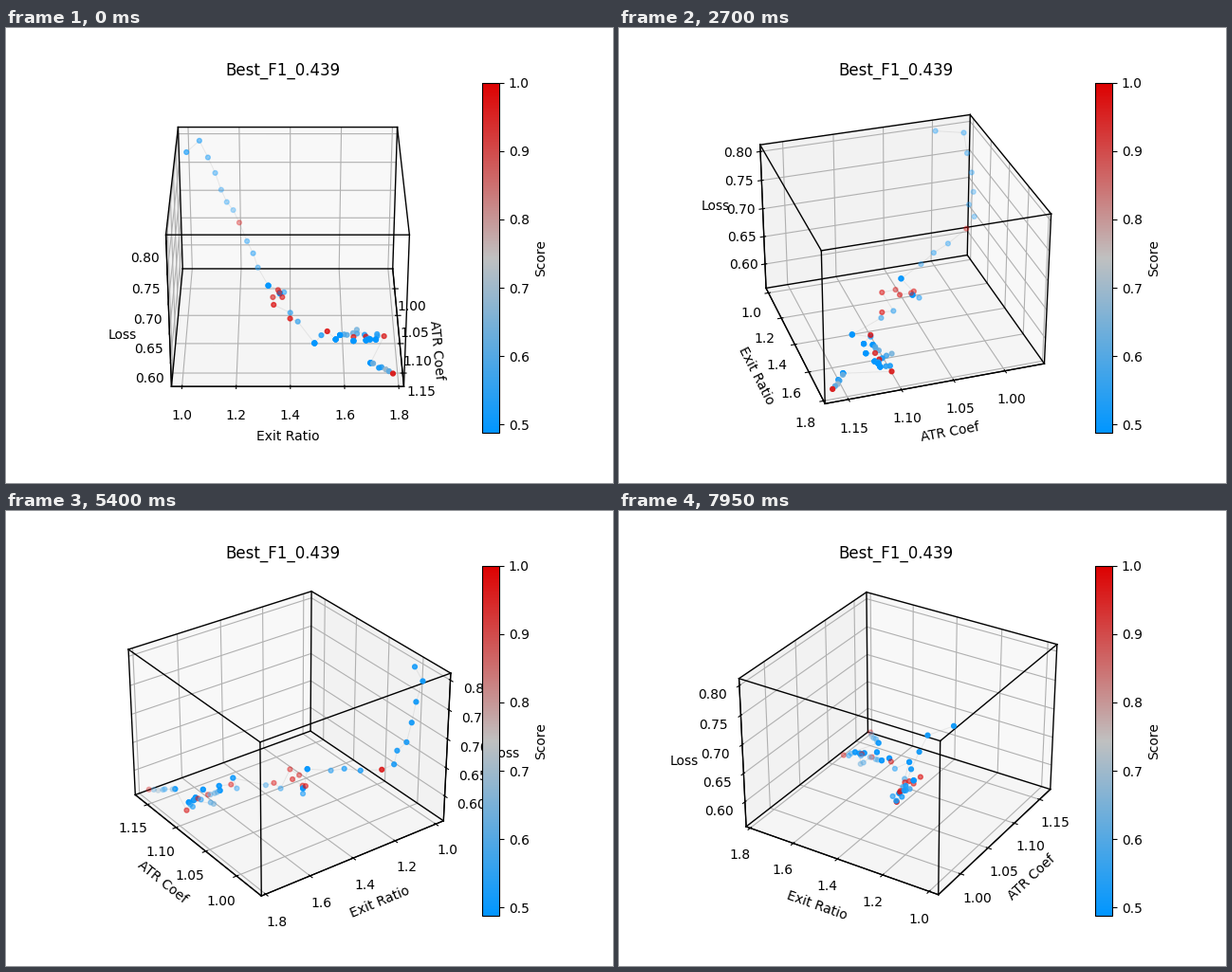
A matplotlib script that plays this animation: 640 px wide and 480 px high, repeating every 8000 ms.

```python
from itertools import product

import matplotlib.pyplot as plt
import numpy as np
from matplotlib.animation import FuncAnimation
from matplotlib.colors import LinearSegmentedColormap

INTERVAL = 50
FRAMES = 160
FRAMES_PER_STEP = 3
DEGREES_PER_STEP = 4
TRIALS = 50

LIMITS = np.array([[0.9612, 1.1720], [0.961, 1.819], [0.5554, 0.8116]])
BOX = np.array([1.19048, 1.19048, 0.89286])

# The search route: trial number -> position in box units from the centre.
ROUTE = {
    0: (-.375, -.541, .406), 1: (-.514, -.477, .404), 4: (-.540, -.360, .091),
    7: (-.460, -.253, -.076), 11: (-.010, -.121, -.217),
    12: (-.110, -.035, -.305), 18: (.090, -.090, -.270),
    19: (.014, -.020, -.336), 22: (.270, .112, -.350), 25: (.250, .260, -.355),
    42: (.260, .500, -.376), 43: (.436, .437, -.400), 49: (.539, .541, -.404),
}
JITTER = (.050, .025, .010)
HIGH_SCORES = np.r_[7, 14:19, 20, 24:43:6, 49]
REPEATED = np.r_[11, 13, 22:44:3]


def make_trials():
    rng = np.random.default_rng(7)
    number = np.arange(TRIALS)
    progress = number / (TRIALS - 1)

    stops = np.array(list(ROUTE.values())).T
    route = np.array([np.interp(number, list(ROUTE), axis) for axis in stops]).T
    spread = np.sin(np.pi * progress)[:, None] * JITTER
    route += spread * rng.normal(size=route.shape)

    score = 0.51 + 0.2 * progress * rng.random(TRIALS)
    score[HIGH_SCORES] = rng.uniform(0.95, 1.0, len(HIGH_SCORES))
    score[REPEATED] = 0.49

    counts = np.ones(TRIALS, int)
    counts[REPEATED] = 4
    scale = np.ptp(LIMITS, axis=1) / BOX
    points = LIMITS.mean(axis=1) + route * scale
    return np.repeat(points, counts, axis=0).T, np.repeat(score, counts)


def draw_box(ax):
    corners = list(product(*LIMITS))
    for i, start in enumerate(corners):
        for end in corners[i + 1:]:
            if sum(a != b for a, b in zip(start, end)) == 1:
                ax.plot(*zip(start, end), color="black", lw=1)


points, score = make_trials()
cmap = LinearSegmentedColormap.from_list("score", ["#0096ff", "silver", "#dd0000"])

fig = plt.figure(figsize=(6.4, 4.8), dpi=100)
ax = fig.add_subplot(projection="3d")
ax.plot(*points, color="gray", alpha=0.15, lw=0.7)
dots = ax.scatter(*points, c=score, s=12, cmap=cmap, vmin=0.4877, vmax=1.0)
fig.colorbar(dots, ax=ax, label="Score")
draw_box(ax)

ax.set_title("Best_F1_0.439")
ax.set(xlabel="ATR Coef", ylabel="Exit Ratio", zlabel="Loss",
       xticks=np.linspace(1.0, 1.15, 4),
       yticks=np.linspace(1.0, 1.8, 5),
       zticks=np.linspace(0.6, 0.8, 5))
ax.set(xlim=LIMITS[0], ylim=LIMITS[1], zlim=LIMITS[2])


def update(frame):
    # The tiny offset keeps the choice of back panes stable at right angles.
    azim = frame // FRAMES_PER_STEP * DEGREES_PER_STEP + 0.01
    ax.view_init(elev=30, azim=azim)
    return []


anim = FuncAnimation(fig, update, frames=FRAMES, init_func=lambda: update(0),
                     interval=INTERVAL, repeat=True, repeat_delay=0)
plt.show()
```
